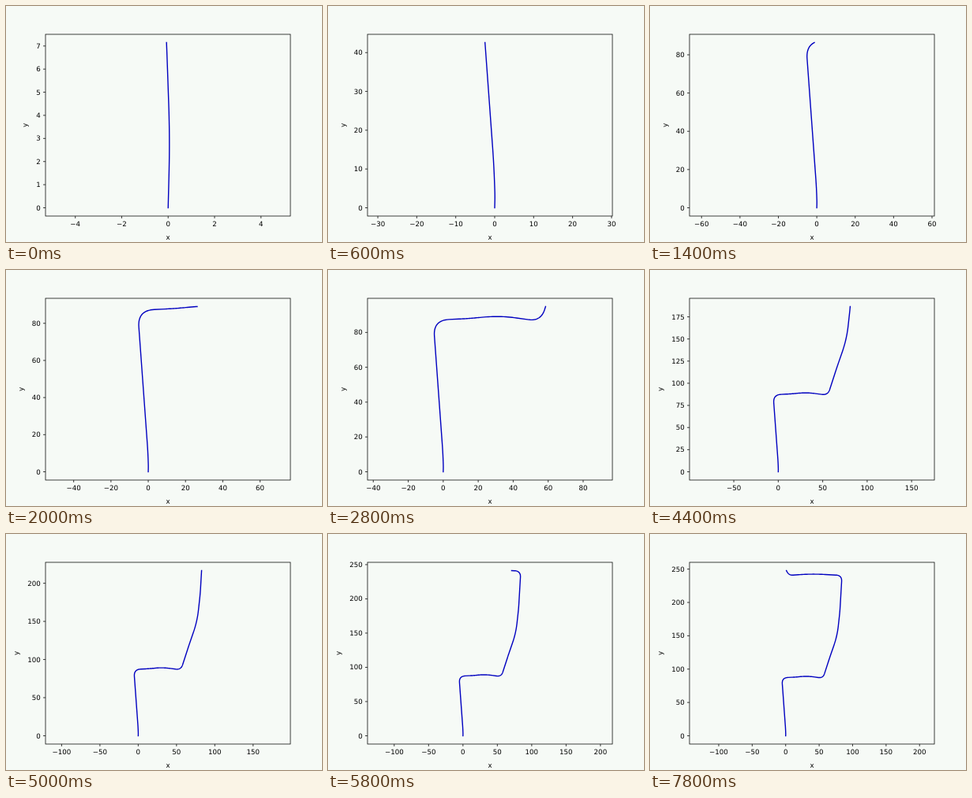
An HTML page that plays this animation: 400x300 px, repeating every 8 s.

```html
<!DOCTYPE html>
<html lang="en">
<head>
<meta charset="utf-8">
<title>Trajectory plot</title>
<style>
  html, body { margin: 0; width: 100%; height: 100%; overflow: hidden; background: #f6faf6; }
  svg { display: block; width: 100vw; height: 100vh; }
  text { font: 8.68px "DejaVu Sans", sans-serif; fill: #000; text-anchor: middle; text-rendering: geometricPrecision; }
  #yTicks text { text-anchor: end; }
  .axis { fill: none; stroke: #000; stroke-width: .75; }
  #track { fill: none; stroke: #0000c0; stroke-width: 1.4; stroke-linejoin: round; stroke-linecap: square; }
</style>
</head>
<body>
<svg viewBox="0 0 400 300">
  <g id="xTicks"></g>
  <g id="yTicks"></g>
  <path id="track"/>
  <rect class="axis" x="50" y="36" width="310" height="231"/>
  <text x="205" y="296.9">x</text>
  <text id="yLabel">y</text>
</svg>
<script>
const FRAME_MS = 200, FRAMES = 40, EM = 8.68;
const BOX = { left: 50, right: 360, top: 36, bottom: 267 };
const MID_X = (BOX.left + BOX.right) / 2, BASE_Y = 256.5, PLOT_H = 210;

// Corners of the route: x, y and how far before and after them the turn reaches.
const corners = [
  [0, 0, 0], [.075, 3, 1.5], [-.2, 11, 5], [-5.7, 87, 9], [15, 88, 6], [32, 89.7, 10],
  [55.8, 86.4, 7], [66, 118, 5], [77, 150, 15], [81, 186.6, 8], [84.1, 240.6, 9],
  [39, 243, 20], [5, 240.6, 6], [1.1, 247.8, 0]
];

// Where the traveller is at some moments: frame, x, y.
const stops = [
  [0, -.055, 7.13], [7, -1.3, 86.4], [14, 59, 94.7], [18, 72.7, 137.4],
  [22, 81, 186.6], [29, 70.8, 241.1], [39, 1.1, 247.8]
];

const byId = id => document.getElementById(id);
const dist = (a, b) => Math.hypot(b[0] - a[0], b[1] - a[1]);
const mix = (a, b, u) => [a[0] + (b[0] - a[0]) * u, a[1] + (b[1] - a[1]) * u];
const toward = (a, b, d) => mix(a, b, d / dist(a, b));

const SUB = 16;
const curve = corners.flatMap((corner, i) => {
  const reach = corner[2];
  if (!reach) return [corner];
  const from = toward(corner, corners[i - 1], reach), to = toward(corner, corners[i + 1], reach);
  return Array.from({ length: SUB + 1 }, (_, j) => {
    const u = j / SUB;
    return mix(mix(from, corner, u), mix(corner, to, u), u);
  });
});

const length = [0];
for (let i = 1; i < curve.length; i++) length.push(length[i - 1] + dist(curve[i - 1], curve[i]));

function pointAt(s) {
  const n = Math.max(1, length.findIndex(l => l >= s));
  return { n, point: mix(curve[n - 1], curve[n], (s - length[n - 1]) / (length[n] - length[n - 1])) };
}

function lengthNear(target) {
  let best = 0, bestGap = Infinity;
  for (let s = 0; s < length.at(-1); s += .05) {
    const gap = dist(pointAt(s).point, target);
    if (gap < bestGap) [best, bestGap] = [s, gap];
  }
  return best;
}

// Smooth travelled distance through the stops.
const keys = stops.map(([frame, x, y]) => ({ frame, s: lengthNear([x, y]) }));
const pace = i => (keys[i + 1].s - keys[i].s) / (keys[i + 1].frame - keys[i].frame);

function speed(i) {
  if (i === 0) return pace(0);
  if (i === keys.length - 1) return pace(i - 1);
  const u = (keys[i].frame - keys[i - 1].frame) / (keys[i + 1].frame - keys[i - 1].frame);
  return pace(i - 1) * (1 - u) + pace(i) * u;
}

function travelled(frame) {
  const i = keys.findLastIndex((key, k) => key.frame <= frame && k < keys.length - 1);
  const a = keys[i], b = keys[i + 1], span = b.frame - a.frame;
  const u = (frame - a.frame) / span, v = 1 - u;
  return (1 + 2 * u) * v * v * a.s + u * u * (3 - 2 * u) * b.s +
    span * u * v * (v * speed(i) - u * speed(i + 1));
}

function ticks(low, high) {
  const raw = (high - low) / 9, power = 10 ** Math.floor(Math.log10(raw));
  const step = [1, 2, 2.5, 5, 10].find(m => m * power >= raw) * power;
  const list = [];
  for (let n = Math.ceil(low / step); n * step <= high; n++) {
    const value = n * step;
    const label = Math.abs(value).toFixed(step % 1 ? 1 : 0);
    list.push({ value, label: (value < 0 ? "\u2212" : "") + label });
  }
  return list;
}

const labelWidth = label => EM * [...label].reduce((w, c) => w + (c === "." ? .318 : .636), 0);

function draw(frame) {
  const { n, point } = pointAt(travelled(frame));
  const points = [...curve.slice(0, n), point];
  const xs = points.map(p => p[0]), ys = points.map(p => p[1]);
  const scale = PLOT_H / Math.max(...ys);
  const centre = (Math.min(...xs) + Math.max(...xs)) / 2;
  const px = x => MID_X + (x - centre) * scale;
  const py = y => BASE_Y - y * scale;
  const halfW = (BOX.right - BOX.left) / 2 / scale;

  byId("track").setAttribute("d",
    "M" + points.map(([x, y]) => px(x).toFixed(2) + " " + py(y).toFixed(2)).join("L"));

  byId("xTicks").innerHTML = ticks(centre - halfW, centre + halfW).map(({ value, label }) =>
    `<path class="axis" d="M${px(value)} ${BOX.bottom}v3"/><text x="${px(value)}" y="279.7">${label}</text>`
  ).join("");

  const yTicks = ticks((BASE_Y - BOX.bottom) / scale, (BASE_Y - BOX.top) / scale);
  byId("yTicks").innerHTML = yTicks.map(({ value, label }) =>
    `<path class="axis" d="M${BOX.left} ${py(value)}h-3"/><text x="43.9" y="${py(value) + 3}">${label}</text>`
  ).join("");

  const widest = Math.max(...yTicks.map(t => labelWidth(t.label)));
  byId("yLabel").setAttribute("transform", `translate(${32.8 - widest} 151.5) rotate(-90)`);
}

let shown = -1;
const start = performance.now();
function tick() {
  const frame = Math.floor((performance.now() - start) / FRAME_MS) % FRAMES;
  if (frame !== shown) draw(shown = frame);
  requestAnimationFrame(tick);
}
tick();
</script>
</body>
</html>
```
